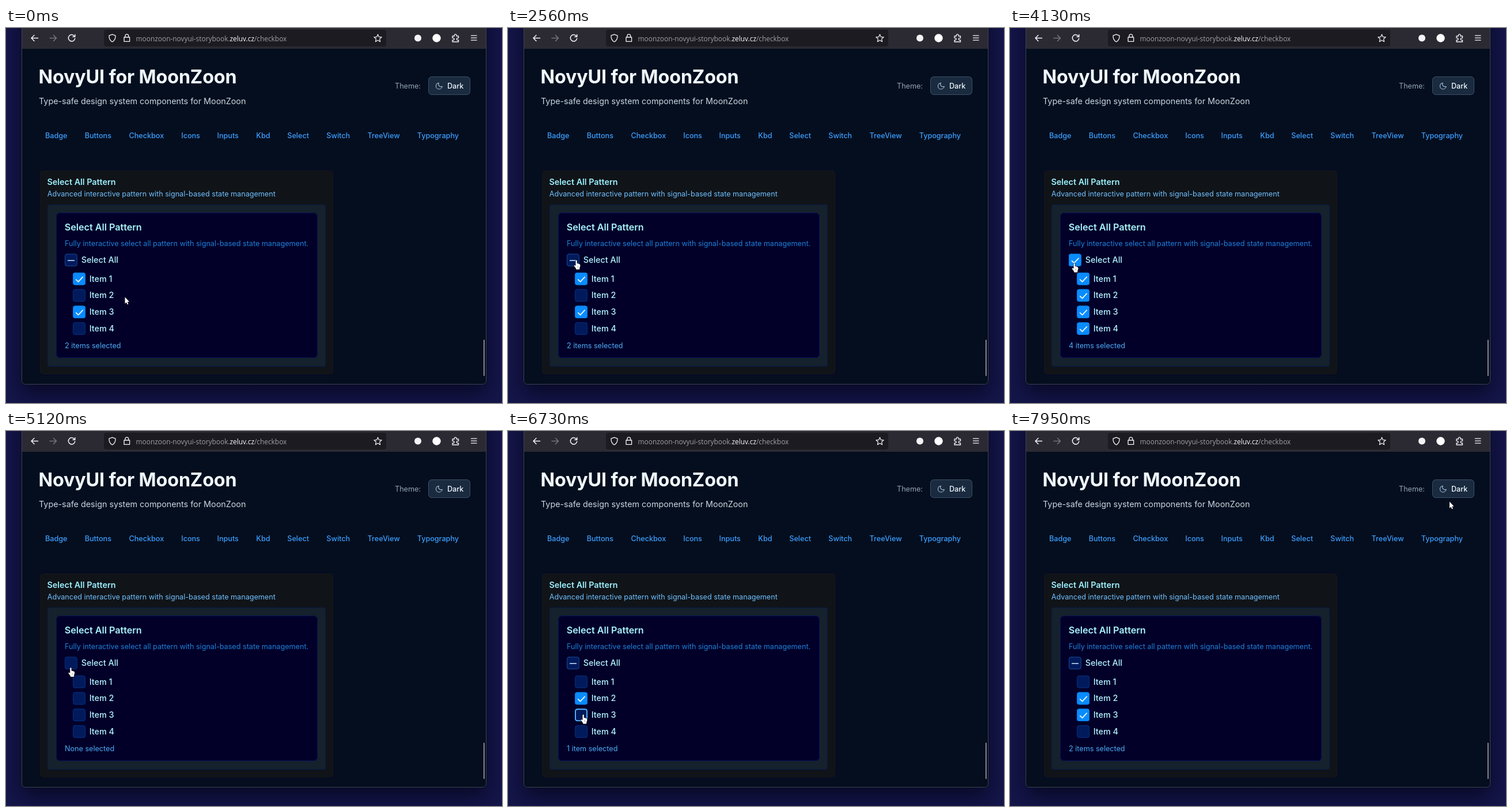
An HTML page with a canvas for the animation above (8 s loop, 861 by 650 pixels).

```html
<!DOCTYPE html>
<html lang="en">
<head>
<meta charset="utf-8">
<title>Checkbox demo</title>
<style>
html, body { margin: 0; width: 100%; height: 100%; overflow: hidden; background: #15164a; }
canvas { display: block; }
</style>
</head>
<body>
<canvas id="stage" width="861" height="650"></canvas>
<script>
const LOOP = 8000;
const canvas = document.getElementById('stage');
const ctx = canvas.getContext('2d');
const UI = 'Inter, sans-serif';
const SMALL = 12.61, BASE = 14.37;

// Cursor hotspot moves: start, end, number of steps, destination, optional bend.
const START = [206, 466];
const MOVES = [
  { from: 70, to: 800, steps: 11, at: [139.5, 466.5], bend: [172, 475] },
  { from: 890, to: 1000, steps: 3, at: [135.5, 465] },
  { from: 1930, to: 2090, steps: 3, at: [119.5, 382] },
  { from: 2260, to: 2560, steps: 4, at: [118.5, 402] },
  { from: 3670, to: 4130, steps: 7, at: [111.5, 407], bend: [127, 455] },
  { from: 5120, to: 5590, steps: 8, at: [128.5, 467] },
  { from: 6250, to: 6510, steps: 5, at: [130.5, 491] },
  { from: 7050, to: 7740, steps: 11, at: [775, 178] },
  { from: 7810, to: 7810, steps: 1, at: [740.5, 172] },
  { from: 7880, to: 7950, steps: 2, at: [762.5, 122] }
];

// Clicks: press time, release time, pressed box (0 = select all), items after.
const CLICKS = [
  { down: 2800, up: 2860, box: 0, items: [1, 1, 1, 1] },
  { down: 4540, up: 4590, box: 0, items: [0, 0, 0, 0] },
  { down: 6120, up: 6185, box: 2, items: [0, 1, 0, 0] },
  { down: 6650, up: 6780, box: 3, items: [0, 1, 1, 0] }
];

const NAV = [['Badge', 68], ['Buttons', 136.7], ['Checkbox', 213.5], ['Icons', 304.2],
  ['Inputs', 366.5], ['Kbd', 434.3], ['Select', 488.3], ['Switch', 556.3],
  ['TreeView', 627.6], ['Typography', 713.7]];

const HAND = [[3.5, 1.5], [4.2, .6], [5.2, .6], [5.8, 1.5], [5.8, 6], [7.8, 6.3], [9.6, 7],
  [11.2, 8], [11.4, 10.5], [10.5, 13], [10, 16.5], [4.5, 16.5], [3.8, 14.5], [1.5, 11.5],
  [.6, 9.8], [1.6, 9], [3.5, 10.3]];
const ARROW = [[.5, .5], [.5, 11.7], [3, 9.4], [4.7, 13.3], [6.4, 12.5], [4.8, 8.8], [8, 8.5]];

function text(str, x, y, size, color, weight = 400, family = UI, spacing = 0) {
  ctx.font = `${weight} ${size}px ${family}`;
  ctx.letterSpacing = spacing + 'px';
  ctx.fillStyle = color;
  ctx.fillText(str, x, y);
  return x + ctx.measureText(str).width;
}

function box(x, y, w, h, r, fill, border) {
  ctx.beginPath();
  ctx.roundRect(x, y, w, h, r);
  ctx.fillStyle = fill;
  ctx.fill();
  if (!border) return;
  ctx.beginPath();
  ctx.roundRect(x + .5, y + .5, w - 1, h - 1, r);
  ctx.lineWidth = 1;
  ctx.strokeStyle = border;
  ctx.stroke();
}

function line(points, color, width, close) {
  ctx.beginPath();
  points.forEach(([x, y]) => ctx.lineTo(x, y));
  if (close) ctx.closePath();
  ctx.strokeStyle = color;
  ctx.lineWidth = width;
  ctx.lineCap = ctx.lineJoin = 'round';
  ctx.stroke();
}

function disc(x, y, r, color) {
  ctx.beginPath();
  ctx.arc(x, y, r, 0, 7);
  ctx.fillStyle = color;
  ctx.fill();
}

function path(d, color, width = 1.3) {
  ctx.strokeStyle = color;
  ctx.lineWidth = width;
  ctx.lineCap = ctx.lineJoin = 'round';
  ctx.stroke(new Path2D(d));
}

function drawBackdrop() {
  ctx.fillStyle = '#15164a';
  ctx.fillRect(0, 0, 861, 650);
  ctx.save();
  ctx.shadowColor = 'rgba(4, 4, 24, .75)';
  ctx.shadowBlur = 34;
  ctx.shadowOffsetY = 14;
  box(27, -40, 807, 658, 6, '#050e1e');
  ctx.restore();
  box(27, -40, 807, 658, 6, '#050e1e', '#3a434f');
}

function drawToolbar() {
  const light = '#f4f4f8', dim = '#75747c';
  ctx.fillStyle = '#2b2a33';
  ctx.fillRect(28, 0, 805, 36);
  box(170, 3, 490, 29, 4, '#1c1b22');

  path('M44 17.5H55.5M49 12.5L44 17.5L49 22.5', light, 1.5);
  path('M76 17.5H87.5M82.5 12.5L87.5 17.5L82.5 22.5', dim, 1.5);
  path('M119 14.5A5.7 5.7 0 1 0 119.7 18M119.8 11.5V15.3H116', light, 1.5);
  path('M184.5 11.2L190 13.2C190.3 18.5 188 22 184.5 24C181 22 178.7 18.5 179 13.2Z', light);
  path('M206.9 16V13.7A2.9 2.9 0 0 1 212.7 13.7V16M205 16H214.6V23.3H205Z', light);

  const grey = '#a0a0a8', face = '"Open Sans", sans-serif', size = 11.9;
  let x = text('moonzoon-novyui-storybook.', 225.5, 22.5, size, grey, 400, face);
  x = text('zeluv.cz', x, 22.5, size, '#fbfbfe', 400, face);
  text('/checkbox', x, 22.5, size, grey, 400, face);

  const star = [];
  for (let i = 0; i < 10; i++) {
    const a = i * Math.PI / 5 - Math.PI / 2, r = i % 2 ? 3.2 : 7;
    star.push([645.5 + r * Math.cos(a), 18 + r * Math.sin(a)]);
  }
  line(star, light, 1.2, true);

  disc(715, 17.5, 6, light);
  disc(747.5, 17.5, 7.2, '#ffffff');
  path('M775 14H778.3V12.8A1.9 1.9 0 0 1 782.1 12.8V14H785.5V17.4H784A1.8 1.8 0 0 0 784 21H785.5V24H775V21H776.3A1.8 1.8 0 0 0 776.3 17.4H775Z', light);
  path('M807.5 13.2H817M807.5 17.2H817M807.5 21.2H817', light, 1.3);
}

function drawPage() {
  text('NovyUI for MoonZoon', 56.5, 96, 32.3, '#f0f9ff', 700, UI, -.15);
  text('Type-safe design system components for MoonZoon', 57, 132, 14.33, '#c8d7e4');
  text('Theme:', 675, 105, SMALL, '#94a4b7');
  box(733, 84, 73, 32, 6, '#1a2a3f', '#3a506b');
  path('M751.4 95.2A5.4 5.4 0 1 0 757.2 101.2A4.3 4.3 0 0 1 751.4 95.2Z', '#a9c6df', 1.1);
  text('Dark', 766, 105, SMALL, '#f0f9ff', 500);
  NAV.forEach(([label, x]) => text(label, x, 190.5, SMALL, '#3b9eff', 500));

  box(57, 245, 513, 357, 8, '#101418', '#02042c');
  text('Select All Pattern', 71.5, 272, BASE, '#9cf0ff', 600);
  text('Advanced interactive pattern with signal-based state management', 71.7, 291.5, SMALL, '#70bfff');
  box(72, 306, 483, 281, 4, '#15212c', '#071a4c');
  box(87, 320, 454, 252, 7, '#020029', '#07145a');
  text('Select All Pattern', 101.7, 351, 16.16, '#a8f2ff', 600);
  text('Fully interactive select all pattern with signal-based state management.', 102, 377.8, SMALL, '#1d80d8');

  line([[829.8, 541], [829.8, 602.5]], '#a2a5aa', 1.6);
}

function drawCheckbox(x, y, mark, pressed) {
  const on = mark === 'check', size = 21.7;
  const border = pressed ? '#55b4ff' : on ? '#0b7fe8' : mark ? '#174893' : '#08307c';
  box(x, y, size, size, 3.5, on ? '#098cff' : '#001a5c', border);
  if (pressed) {
    ctx.beginPath();
    ctx.roundRect(x + 1, y + 1, size - 2, size - 2, 3);
    ctx.lineWidth = 1.6;
    ctx.stroke();
  }
  if (on) line([[x + 5.5, y + 12.2], [x + 9.3, y + 16], [x + 17, y + 7.8]], '#e9f8ff', 1.8);
  if (mark === 'dash') line([[x + 5.7, y + 11.6], [x + 16.3, y + 11.6]], '#cfeaff', 1.7);
}

function drawList(t) {
  let items = [1, 0, 1, 0], pressed = -1;
  for (const c of CLICKS) {
    if (t >= c.up) items = c.items;
    else if (t >= c.down) pressed = c.box;
  }
  const count = items.reduce((a, b) => a + b);
  const label = '#b3f3ff';
  drawCheckbox(102, 391.4, count === 4 ? 'check' : count ? 'dash' : '', pressed === 0);
  text('Select All', 130.7, 407.2, BASE, label, 500);
  items.forEach((on, i) => {
    const y = i * 28.75;
    drawCheckbox(116.2, 423.9 + y, on ? 'check' : '', pressed === i + 1);
    text('Item ' + (i + 1), 144.7, 439.7 + y, BASE, label, 500);
  });
  const status = count ? `${count} item${count > 1 ? 's' : ''} selected` : 'None selected';
  text(status, 102, 554.5, SMALL, '#4dabf5');
}

function cursorAt(t) {
  let p = START;
  for (const m of MOVES) {
    if (t < m.from) break;
    const gap = (m.to - m.from) / (m.steps - 1 || 1);
    const k = t >= m.to ? m.steps : 1 + Math.floor((t - m.from) / gap);
    const u = k / m.steps, e = u * u * (3 - 2 * u), v = 1 - e;
    const start = p;
    p = m.at.map((end, i) => {
      const mid = m.bend ? m.bend[i] : (start[i] + end) / 2;
      return v * v * start[i] + 2 * v * e * mid + e * e * end;
    });
  }
  return p;
}

function drawCursor([x, y]) {
  const overRow = x < 190 && y > 380 && y < 535;
  const overLink = x > 703 && x < 796 && y > 170 && y < 202;
  const hand = overRow || overLink;
  const shape = hand ? HAND : ARROW;
  ctx.save();
  ctx.translate(hand ? x - 4.5 : x, y);
  line(shape, '#0a0a14', 1.3, true);
  ctx.fillStyle = '#ffffff';
  ctx.fill();
  if (hand) line([[7.2, 13], [7.2, 10.5]], '#55555f', .6);
  ctx.restore();
}

function draw(now) {
  const t = now % LOOP;
  drawBackdrop();
  drawToolbar();
  drawPage();
  drawList(t);
  drawCursor(cursorAt(t));
}

let origin;
function tick(now) {
  origin ??= now;
  draw(now - origin);
  requestAnimationFrame(tick);
}
draw(0);
requestAnimationFrame(tick);
</script>
</body>
</html>
```
